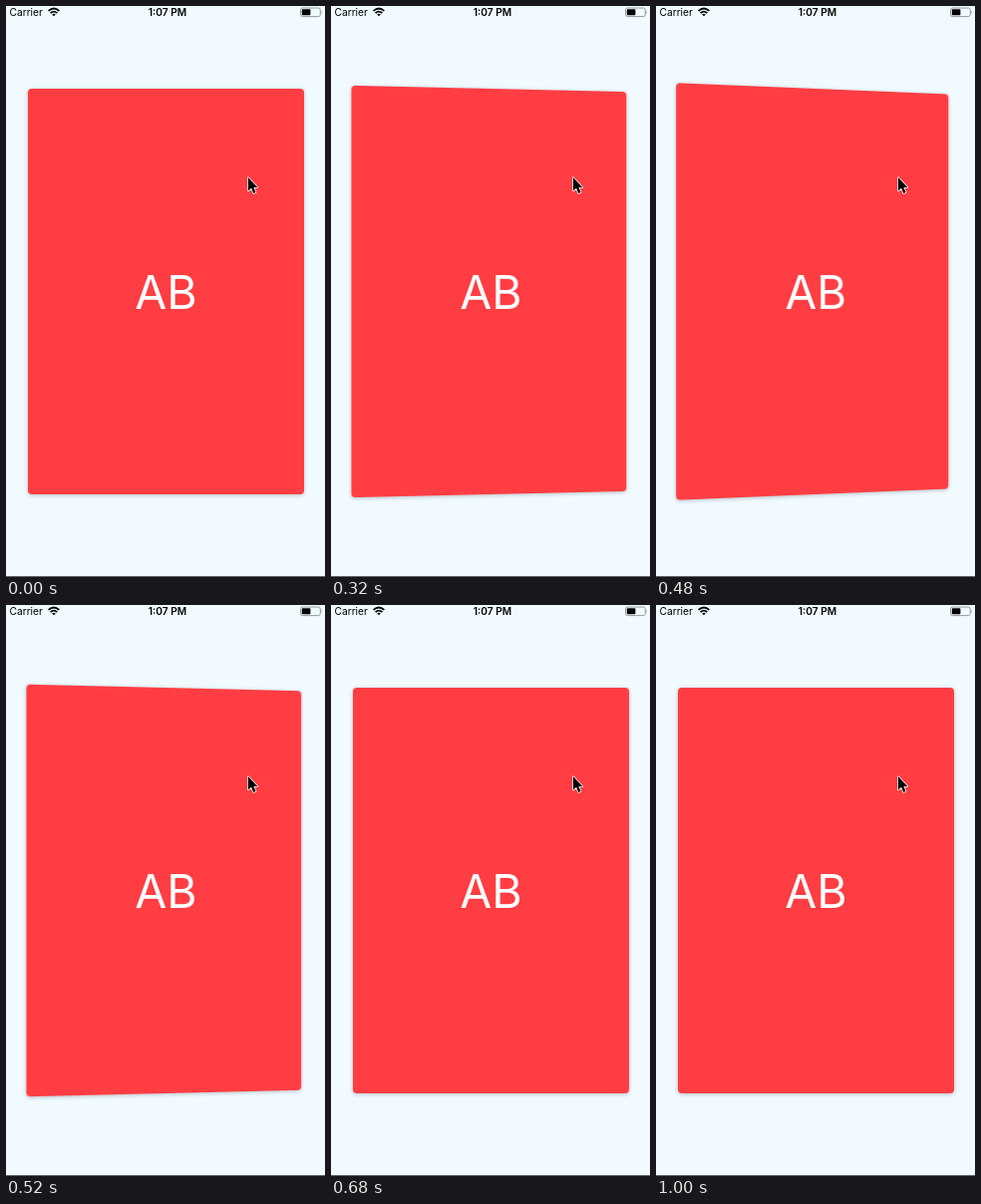
An HTML page for the animation above (1.08 s loop, 320 by 573 pixels).

```html
<!DOCTYPE html>
<html lang="en">
<head>
<meta charset="utf-8">
<title>Tilting card</title>
<style>
  html, body { margin: 0; width: 100%; height: 100%; overflow: hidden; background: #f0faff; }
  #card {
    position: absolute; left: 22px; top: 82.5px; width: 277px; height: 407px;
    border-radius: 4px; background: #ff3d42; color: #fff;
    box-shadow: 0 1px 4px rgba(0, 0, 0, .24);
    font: 400 46.5px/409px Inter, "Noto Sans", sans-serif; text-align: center;
  }
  svg { position: absolute; left: 0; top: 0; }
  text { font: 10.2px Inter, "Noto Sans", sans-serif; }
</style>
</head>
<body>
<div id="card">AB</div>
<svg width="320" height="573" viewBox="0 0 320 573">
  <text x="3.5" y="10">Carrier</text>
  <text x="162" y="10" text-anchor="middle" style="font-weight: 600">1:07 PM</text>
  <!-- Wi-Fi -->
  <g fill="none" stroke="#000" stroke-width="1.8">
    <path d="M42.6 4.9Q48 .1 53.4 4.9M44.6 7.2Q48 4.1 51.4 7.2"/>
    <path d="M46.2 8.5Q48 7.1 49.8 8.5L48 10.3Z" fill="#000" stroke="none"/>
  </g>
  <!-- battery -->
  <rect x="295.5" y="2" width="19.8" height="8.6" rx="2" fill="none" stroke="#8b9194" stroke-width=".9"/>
  <rect x="296.8" y="3.3" width="8.6" height="6" rx=".8"/>
  <path d="M316.3 4.8q1.5 1.5 0 3z" fill="#8b9194"/>
  <!-- pointer -->
  <path d="M243 172V185.6L246.1 182.8L248.3 188L250.6 187L248.4 181.9H252.3Z"
        stroke="#fff" stroke-width="1.5" paint-order="stroke" stroke-linejoin="round"/>
  <path d="M0 572.5H320" stroke="#62686b"/>
</svg>
<script>
  const card = document.getElementById('card');
  const LOOP = 1080, STEP = 40, START = 215, PEAK = 480, END = 680, MAX = 9.8;

  // Ease up to the peak, then spring back quickly.
  function tilt(t) {
    if (t < START || t >= END) return 0;
    if (t <= PEAK) return MAX * Math.sin((t - START) / (PEAK - START) * Math.PI / 2) ** 1.1;
    return MAX * Math.exp(-(((t - PEAK) / 60) ** 1.5));
  }

  const begin = performance.now();
  function draw() {
    const time = (performance.now() - begin) % LOOP;
    const angle = tilt(Math.floor(time / STEP) * STEP);
    card.style.transform = `perspective(853px) rotateY(${angle}deg)`;
    requestAnimationFrame(draw);
  }
  draw();
</script>
</body>
</html>
```
